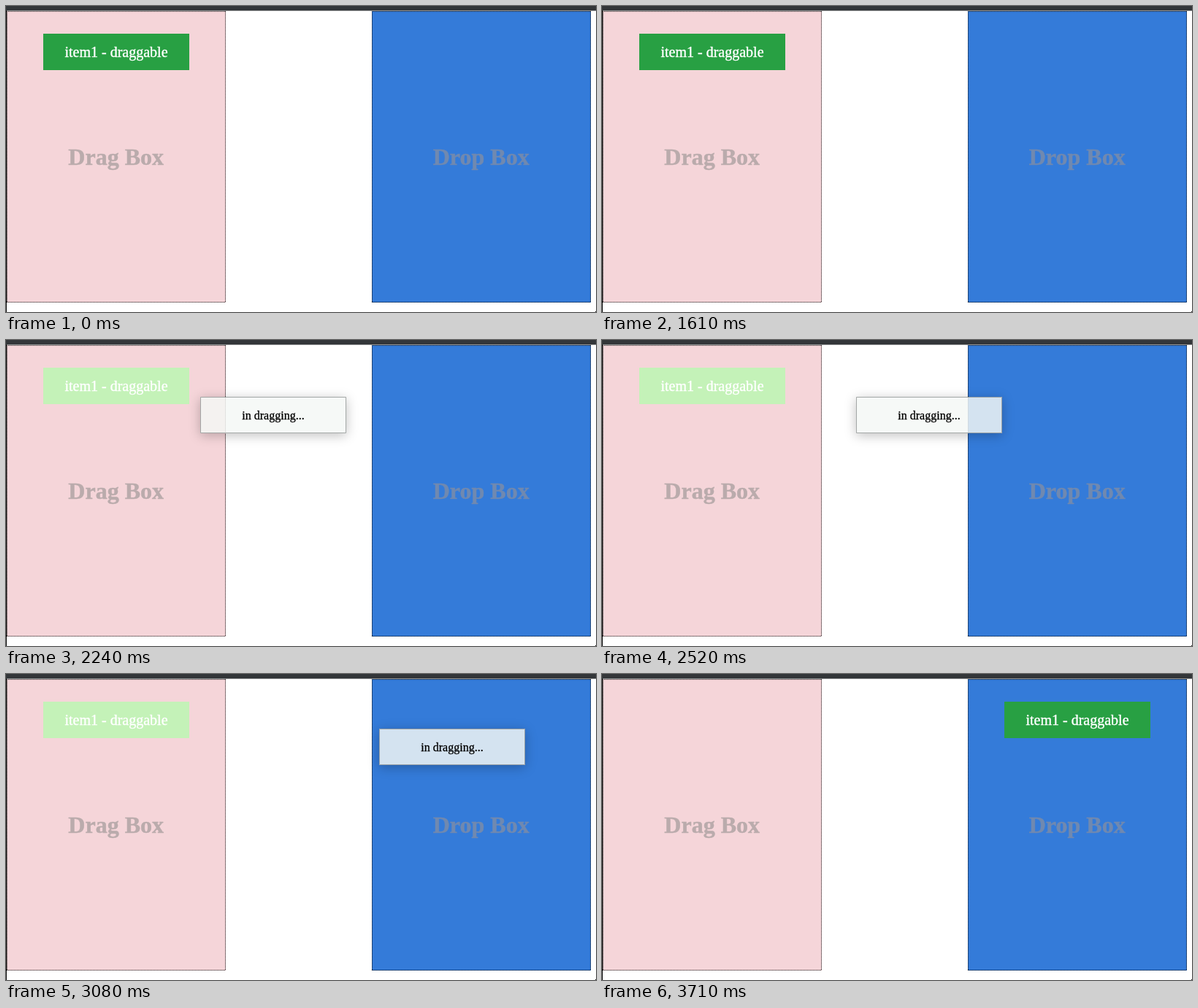
Animation, 808 px wide and 420 px high, one loop 4.13 s. Source, as an HTML page with a canvas:

```html
<!DOCTYPE html>
<html lang="en">
<head>
<meta charset="utf-8">
<title>Drag and drop</title>
<style>
  html, body { margin: 0; width: 100%; height: 100%; overflow: hidden; background: #fff; }
  canvas { display: block; }
</style>
</head>
<body>
<canvas id="stage" width="808" height="420"></canvas>
<script>
const ctx = document.getElementById('stage').getContext('2d');
const SERIF = '"Liberation Serif", "Times New Roman", serif';
const LOOP = 4130, TICK = 70;
const FADE_AT = 1890, LIFT_AT = 2030, DROP_AT = 3220;

// Drag path: time, x, y
const PATH = [
  [2030, 200, 77], [2240, 266, 78], [2520, 348, 78], [2660, 398, 78],
  [2870, 480, 76], [2940, 496, 76], [3080, 511, 75]
];

function rect(x, y, w, h, color) {
  ctx.fillStyle = color;
  ctx.fillRect(x, y, w, h);
}

// Rectangle with slightly softened edges, as in a scaled screen capture
function softRect(x, y, w, h, color) {
  ctx.filter = 'blur(0.4px)';
  rect(x, y, w, h, color);
  ctx.filter = 'none';
}

function label(text, x, y, font, color, weight = 0.3) {
  ctx.font = font + ' ' + SERIF;
  ctx.fillStyle = ctx.strokeStyle = color;
  ctx.lineWidth = weight;
  ctx.lineJoin = 'round';
  ctx.textAlign = 'center';
  ctx.fillText(text, x, y);
  ctx.strokeText(text, x, y);
}

function panel(x, title, fill, ink) {
  softRect(x, 7, 300, 400, fill);
  ctx.strokeStyle = 'rgba(0,0,0,0.9)';
  ctx.lineWidth = 1;
  ctx.setLineDash([1, 1]);
  ctx.beginPath();
  for (const y of [7.5, 406.5]) {
    ctx.moveTo(x, y);
    ctx.lineTo(x + 300, y);
  }
  for (const side of [x + 0.5, x + 299.5]) {
    ctx.moveTo(side, 7);
    ctx.lineTo(side, 407);
  }
  ctx.stroke();
  ctx.setLineDash([]);
  label(title, x + 149.7, 218, 'bold 32px', ink, 0.5);
}

function item(x, fill) {
  softRect(x, 38, 200, 50, fill);
  label('item1 - draggable', x + 100, 70, '20px', '#fff', 0.4);
}

function ghost(x, y) {
  // Shadow only outside the translucent card
  ctx.save();
  ctx.beginPath();
  ctx.rect(0, 0, 808, 420);
  ctx.rect(x, y, 200, 50);
  ctx.clip('evenodd');
  ctx.shadowColor = 'rgba(0,0,0,0.25)';
  ctx.shadowBlur = 16;
  ctx.shadowOffsetY = 3;
  rect(x, y, 200, 50, '#000');
  ctx.restore();

  rect(x, y, 200, 50, 'rgba(244,248,246,0.83)');
  ctx.strokeStyle = 'rgba(120,125,125,0.65)';
  ctx.lineWidth = 1;
  ctx.strokeRect(x + 0.5, y + 0.5, 199, 49);
  label('in dragging...', x + 100, y + 31, '16px', '#000');
}

function pathAt(t) {
  const next = PATH.findIndex(p => p[0] > t);
  if (next < 0) return PATH[PATH.length - 1].slice(1);
  const a = PATH[next - 1], b = PATH[next];
  const k = (t - a[0]) / (b[0] - a[0]);
  return [1, 2].map(i => Math.round(a[i] + (b[i] - a[i]) * k));
}

function draw(t) {
  rect(0, 0, 808, 420, '#fff');
  rect(0, 0, 808, 6.5, '#333639');
  rect(0, 6, 1, 414, '#111');
  rect(807, 419, 1, 1, '#111');
  panel(1, 'Drag Box', '#f5d5d9', '#baabac');
  panel(501, 'Drop Box', '#347bd9', '#7089b0');
  if (t >= DROP_AT) item(551, '#28a043');
  else item(51, t < FADE_AT ? '#28a043' : '#c4f2b8');
  if (t >= LIFT_AT && t < DROP_AT) ghost(...pathAt(t));
}

const start = performance.now();
function frame() {
  const t = (performance.now() - start) % LOOP;
  draw(Math.floor(t / TICK) * TICK);
  requestAnimationFrame(frame);
}
frame();
</script>
</body>
</html>
```
